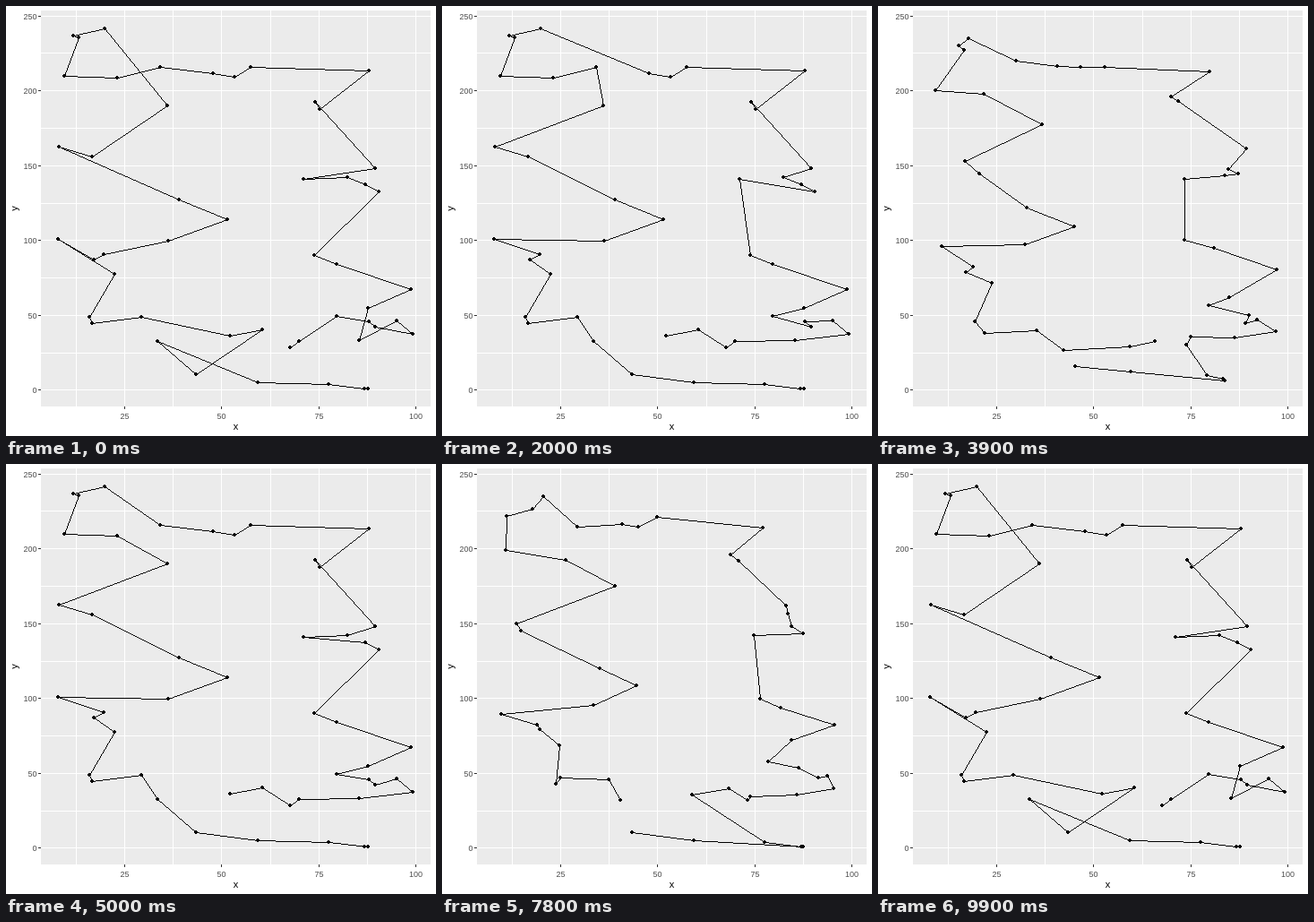
An HTML page with a canvas that plays this animation: 480x480 px, repeating every 10000 ms.

```html
<!DOCTYPE html>
<html lang="en">
<head>
<meta charset="utf-8">
<title>Route comparison</title>
<style>
  html, body { margin: 0; width: 480px; height: 480px; overflow: hidden; background: #fff; }
  svg, canvas { position: absolute; left: 0; top: 0; display: block; }
  text { font-family: "Liberation Sans", Arial, sans-serif; }
  .tick { font-size: 9px; fill: #4d4d4d; }
  .title { font-size: 11px; text-anchor: middle; }
</style>
</head>
<body>
<svg width="480" height="480" viewBox="0 0 480 480">
  <rect x="39" y="5" width="435" height="442" fill="#ebebeb"/>
  <g id="axes"></g>
  <text class="title" x="256.5" y="473">x</text>
  <text class="title" transform="translate(13 226) rotate(-90)">y</text>
</svg>
<canvas id="plot" width="480" height="480"></canvas>
<script>
const axes = document.getElementById('axes');
const ctx = document.getElementById('plot').getContext('2d');

function add(tag, attrs, text = '') {
  const el = document.createElementNS('http://www.w3.org/2000/svg', tag);
  for (const key in attrs) el.setAttribute(key, attrs[key]);
  el.textContent = text;
  axes.append(el);
}
const box = (x, y, width, height, fill) => add('rect', { x, y, width, height, fill });

const toX = v => Math.round(23.7 + v * 4.333);
const toY = v => Math.round(428.4 - v * 1.671);

for (let v = 12.5; v <= 100; v += 12.5) box(toX(v), 5, 1, 442, '#fff');
for (let v = 0; v <= 250; v += 25) box(39, toY(v), 435, 1, '#fff');
for (let v = 25; v <= 100; v += 25) {
  box(toX(v), 447, 1, 3, '#333');
  add('text', { class: 'tick', x: toX(v) + 0.5, y: 461, 'text-anchor': 'middle' }, v);
}
for (let v = 0; v <= 250; v += 50) {
  box(36, toY(v), 3, 1, '#333');
  add('text', { class: 'tick', x: 34.5, y: toY(v) + 4, 'text-anchor': 'end' }, v);
}

const cities = `212,411 281,420 400,427 404,427 360,422 250,368 286,361 317,381 327,374 394,373
  454,366 436,351 412,358 405,352 369,346 404,337 452,316 369,288 344,278 332,193
  416,207 401,199 381,191 412,181 350,115 345,107 405,72 273,68 255,79 231,75
  172,68 110,25 75,33 81,35 65,78 124,80 180,111 59,157 96,168 193,216
  247,238 181,262 58,260 109,277 98,283 121,299 93,347 96,354 151,347 169,374`
  .split(/\s+/).map(p => p.split(',').map(Number));

// Expands "3 5-7 9-8" into the cities visited in that order.
function route(spec) {
  return spec.split(' ').flatMap(part => {
    const [a, b = a] = part.split('-').map(Number);
    const dir = Math.sign(b - a);
    return Array.from({ length: Math.abs(b - a) + 1 }, (_, i) => cities[a + i * dir]);
  });
}

const swapped = route('0-1 3-2 4 7-19 22 20-21 23-31 33-32 34-49 5-6');
const looped = route('5-18 20-21 19 22-23 25-24 26-49 0-1 4-2');
const routes = [
  route('7-8 14-12 10-11 9 15-18 20-22 19 23 25-24 26-30 35-31 36 38-37 39-41 43-44 42 45-48 5-6 0 49 1 4 2-3'),
  swapped,
  route('5-11 13-12 14-23 25-24 26-29 31-35 30 36-49 0-1 4 2-3'),
  looped,
  swapped,
  looped,
  route('5-23 25-24 26-49 0-1 4-2'),
  route('0-4 9-19 22 20-21 23-45 47-46 48-49 5-6 8-7'),
  route('0-1 3-2 4-31 33-32 34-45 47-46 48-49'),
  route('9-49 5-8 0-1 4 2-3')
];

// Hard-edged one-pixel line.
function line([x0, y0], [x1, y1]) {
  const n = Math.max(Math.abs(x1 - x0), Math.abs(y1 - y0), 1);
  for (let i = 0; i <= n; i++) {
    ctx.fillRect(Math.round(x0 + (x1 - x0) * i / n), Math.round(y0 + (y1 - y0) * i / n), 1, 1);
  }
}

function dot([x, y]) {
  ctx.fillRect(x - 2, y - 1, 4, 2);
  ctx.fillRect(x - 1, y - 2, 2, 4);
}

const STEP = 100, STEPS = 100, MOVE = 5;
const moveStart = k => 6 + 10 * k - (k >= 5 ? 1 : 0);

function pose(step) {
  let k = 0;
  while (k < 9 && step >= moveStart(k) + MOVE) k++;
  const p = Math.min(1, Math.max(0, (step - moveStart(k) + 1) / MOVE));
  const to = routes[(k + 1) % routes.length];
  return routes[k].map((from, i) =>
    from.map((v, axis) => Math.round(v + (to[i][axis] - v) * p)));
}

let shown = -1;
const t0 = performance.now();

function draw() {
  const step = Math.floor((performance.now() - t0) / STEP) % STEPS;
  if (step !== shown) {
    shown = step;
    const points = pose(step);
    ctx.clearRect(0, 0, 480, 480);
    points.forEach((p, i) => {
      if (i) line(points[i - 1], p);
      dot(p);
    });
  }
  requestAnimationFrame(draw);
}
draw();
</script>
</body>
</html>
```
